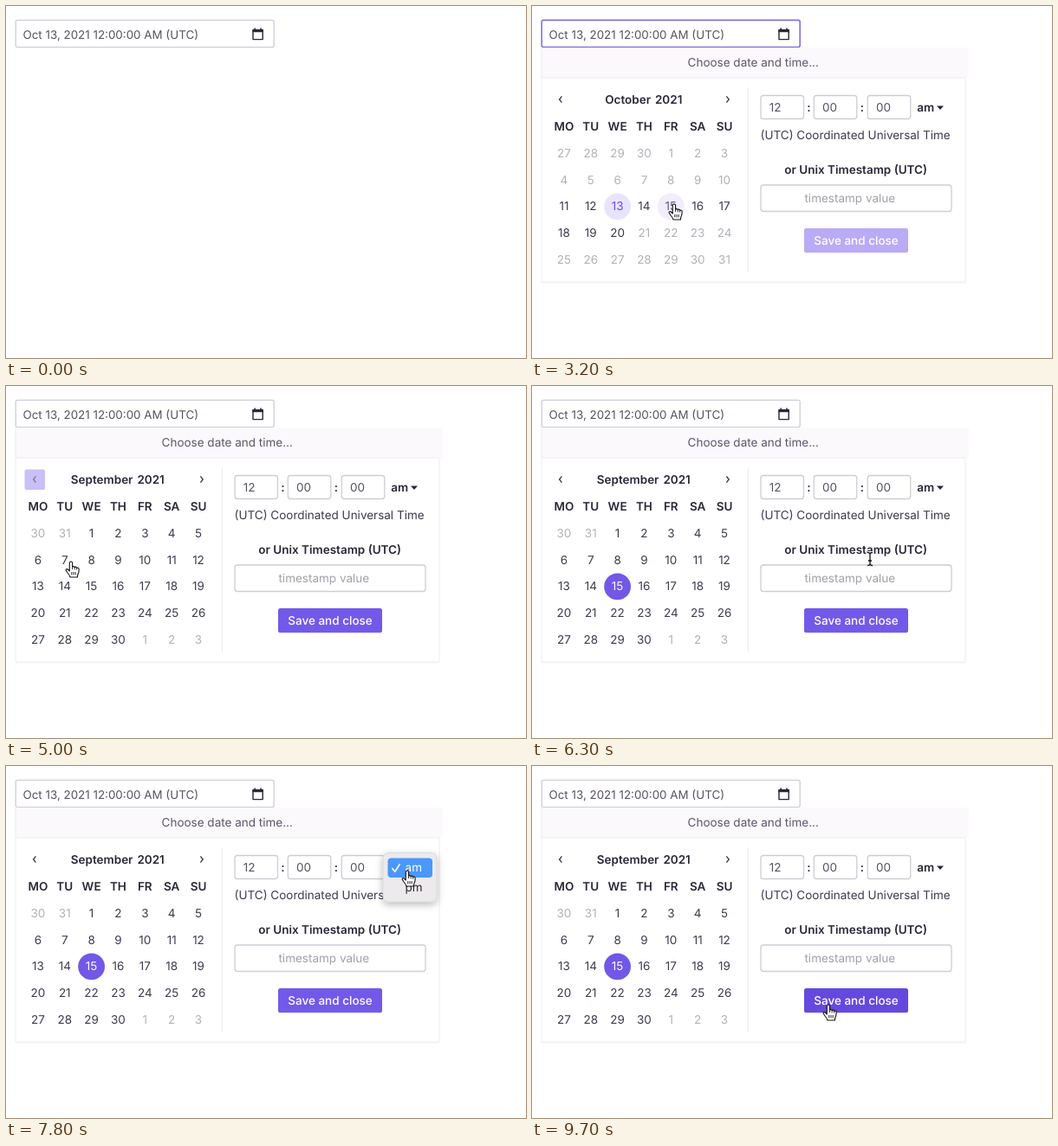
An HTML page for the animation above (9800 ms loop, 600x407 px).

```html
<!DOCTYPE html>
<html lang="en">
<head>
<meta charset="utf-8">
<title>Date and time picker</title>
<style>
  html, body { margin: 0; width: 100%; height: 100%; overflow: hidden; background: #fff; }
  svg { display: block; width: 100%; height: 100%; }
  text { font: 400 13.5px Inter, sans-serif; fill: #3f394c; white-space: pre; text-rendering: geometricPrecision; }
  .mid { text-anchor: middle; }
  .bold { font-weight: 600; fill: #2b2536; }
  .medium { font-weight: 500; }
  .soft { fill: #57515f; }
  .faint { fill: #a3a0a8; }
  .field { fill: #fff; stroke: #d0cdd5; stroke-width: 1.3; }
  .rule { fill: none; stroke: #eeecf0; }
  .chevron { fill: none; stroke: #39334a; stroke-width: 1.3; }
</style>
</head>
<body>
<svg viewBox="0 0 600 407">
  <defs>
    <filter id="shadow" x="-30%" y="-30%" width="160%" height="170%">
      <feDropShadow dx="0" dy="3" stdDeviation="4" flood-opacity=".28"/>
    </filter>
  </defs>

  <rect id="input" class="field" x="11.2" y="16.4" width="298" height="31.2" rx="2"/>
  <text class="soft" x="19.5" y="37.7" style="font-size:13.38px">Oct 13, 2021 12:00:00 AM (UTC)</text>
  <g id="icon">
    <path d="M285 28.2h11.2v10.4h-11.2z" fill="none" stroke="currentColor" stroke-width="1.4" stroke-linejoin="round"/>
    <path d="M284.4 27h12.4v3.3h-12.4zM286.4 25.5h1.6v2h-1.6zM293.2 25.5h1.6v2h-1.6z" fill="currentColor"/>
  </g>

  <g id="popup">
    <rect x="10.5" y="48.3" width="493.5" height="34.7" fill="#fbf9fc"/>
    <path class="rule" d="M11 48.5V319H500V83M11 83H500M249.5 94V308"/>
    <path class="rule" d="M11 320H500.5" opacity=".6"/>
    <text class="mid" x="255.2" y="69.7" style="fill:#5b556b">Choose date and time...</text>
    <g id="weekdays"></g>
    <text id="month" class="mid bold" x="128.8" y="112.7" style="word-spacing:1.5px"></text>

    <g id="fields"></g>
    <text class="bold mid" x="319.5" y="121.8">:</text>
    <text class="bold mid" x="381" y="121.8">:</text>
    <text class="bold" x="444.3" y="122">am</text>
    <path d="M467 115.6h8l-4 4.4z" fill="#2b2536"/>
    <text x="263.5" y="154.3">(UTC) Coordinated Universal Time</text>
    <text class="bold mid" x="373.7" y="193.6">or Unix Timestamp (UTC)</text>
    <rect class="field" x="264" y="207" width="220" height="30.5" rx="3"/>
    <text class="faint mid" x="366.8" y="227">timestamp value</text>

    <g id="late">
      <rect id="prevBack" x="21.5" y="96.5" width="23.5" height="23.5" rx="2" fill="#cabff7"/>
      <path id="prev" class="chevron" d="M34.4 104.4l-2.8 3.6 2.8 3.6"/>
      <path class="chevron" d="M224.4 104.4l2.8 3.6-2.8 3.6"/>
      <g id="days"></g>
      <rect id="save" x="314" y="257" width="120" height="28.2" rx="2.5"/>
      <text class="medium mid" x="374" y="275.6" style="fill:#fff">Save and close</text>
    </g>
  </g>

  <g id="menu">
    <rect x="435" y="100.5" width="62" height="56.5" rx="6" fill="#eceaec" stroke="#cfcdd0" stroke-width=".6" filter="url(#shadow)"/>
    <rect id="choice" x="440.5" width="51.5" height="22.5" rx="4" fill="#4a98fb"/>
    <path id="check" d="M445.8 118.6l3 3.6 5.4-8.4" fill="none" stroke-width="1.6" stroke-linecap="round" stroke-linejoin="round"/>
    <text id="am" x="460.6" y="122">am</text>
    <text id="pm" x="460.6" y="145">pm</text>
  </g>

  <g id="cursor">
    <path id="arrow" d="M0 0V14.6L3.4 11.5 5.9 17 8.2 16 5.8 10.6H10.3Z" fill="#000" stroke="#fff" stroke-width="1.1"/>
    <g id="hand" stroke="#111" stroke-width="1.1" stroke-linejoin="round">
      <path d="M-1.7 1Q0 -1 1.6 1V6Q3 5 4.2 6.4 5.6 5.6 6.6 7.2 9.3 6.6 9.2 9.4L8.8 12.6Q7.5 15 7.4 18H-1Q-1.8 15.4 -4 13L-5.9 10Q-5.6 7.9 -3.6 9L-1.7 11Z" fill="#fff"/>
      <path d="M1.6 6v3M4.2 6.4v3M6.6 7.2v2.4M.8 12v3.4M3 12v3.4M5.2 12v3.4" fill="none" stroke-width=".9"/>
    </g>
    <g id="beam" fill="none">
      <path d="M-3 -7.5Q0 -7.5 0 -5.5 0 -7.5 3 -7.5M0 -5.5V5.5M-3 7.5Q0 7.5 0 5.5 0 7.5 3 7.5M-2 2H2" stroke="#fff" stroke-width="3"/>
      <path d="M-3 -7.5Q0 -7.5 0 -5.5 0 -7.5 3 -7.5M0 -5.5V5.5M-3 7.5Q0 7.5 0 5.5 0 7.5 3 7.5M-2 2H2" stroke="#111" stroke-width="1.3"/>
    </g>
  </g>
</svg>

<script>
const LOOP = 9800, STEP = 100, HOVER_LAG = 200;
const AT = {
  enter: 100, focus: 1000, popup: 1200, late: 1500, pickOctober: 3400,
  september: 4600, pickSeptember: 5700, menuOpen: 7300, menuClose: 9000
};
// time, x, y of the pointer's hot spot
const PATH = [
  [100, 457, 183], [700, 160, 32], [800, 152.5, 27.5], [1900, 152.5, 27.5],
  [2600, 164, 229], [4000, 164, 229], [4400, 33, 108], [4800, 33, 108],
  [5000, 75, 203], [5300, 101, 229], [5900, 101, 229], [6300, 390, 200],
  [6700, 470, 116], [7400, 470, 116], [7700, 463, 121], [7800, 463, 121],
  [7900, 464, 136], [8400, 466, 138], [8800, 436, 214], [9000, 436, 214],
  [9300, 356, 297], [9500, 342, 276], [9800, 342, 276]
];
const COLUMN = 30.85, ROW = 30.8, FIRST = { x: 36.9, y: 170 };

const $ = id => document.getElementById(id);
const show = (id, on) => { $(id).style.display = on ? "" : "none"; };
const inside = (p, x, y, w, h) => p.x >= x && p.x <= x + w && p.y >= y && p.y <= y + h;

function add(parent, tag, attributes, content = "") {
  const node = document.createElementNS(parent.namespaceURI, tag);
  for (const name in attributes) node.setAttribute(name, attributes[name]);
  node.textContent = content;
  return parent.appendChild(node);
}

["MO", "TU", "WE", "TH", "FR", "SA", "SU"].forEach((name, i) =>
  add($("weekdays"), "text", { class: "mid bold", x: FIRST.x + i * COLUMN, y: 143.7 }, name));

[[264, "12"], [325.3, "00"], [387.3, "00"]].forEach(([x, value]) => {
  add($("fields"), "rect", { class: "field", x, y: 103.5, width: 49.5, height: 27, rx: 3 });
  add($("fields"), "text", { class: "soft", x: x + 9.7, y: 122 }, value);
});

const cells = Array.from({ length: 35 }, (_, i) => {
  const x = FIRST.x + i % 7 * COLUMN, y = FIRST.y + Math.floor(i / 7) * ROW;
  return {
    x, y,
    disc: add($("days"), "circle", { cx: x, cy: y + .3, r: 15.4 }),
    label: add($("days"), "text", { class: "mid", x, y: y + 4.7 })
  };
});

function pointer(t) {
  const next = PATH.findIndex(point => point[0] > t);
  if (next < 1) return { x: PATH[0][0], y: -50 };
  const [t0, x0, y0] = PATH[next - 1], [t1, x1, y1] = PATH[next];
  const u = (t - t0) / (t1 - t0), ease = u * u * (3 - 2 * u);
  return { x: x0 + (x1 - x0) * ease, y: y0 + (y1 - y0) * ease };
}

const overInput = p => inside(p, 11, 16, 298, 32);
const overPrev = p => inside(p, 21, 96, 24, 24);
const overSave = p => inside(p, 314, 257, 120, 28);
const overCell = (p, c) => inside(p, c.x - 15.4, c.y - 15.4, 30.8, 30.8);

function calendar(t) {
  const september = t >= AT.september;
  const before = september ? 2 : 4, previous = september ? 31 : 30, length = september ? 30 : 31;
  $("month").textContent = september ? "September 2021" : "October 2021";
  const hover = pointer(t - HOVER_LAG);
  cells.forEach((cell, i) => {
    const n = i - before + 1;
    const day = n < 1 ? previous + n : n > length ? n - length : n;
    const inMonth = n >= 1 && n <= length;
    cell.enabled = inMonth && (september || (n > 10 && n < 21));
    const chosen = n === 15 && t >= (september ? AT.pickSeptember : AT.pickOctober);
    const current = !september && n === 13 && t < AT.pickOctober;
    const hovered = cell.enabled && overCell(hover, cell);
    cell.label.textContent = day;
    cell.label.style.fill = chosen ? "#fff" : current ? "#6b4bdc" : hovered ? "#625b78" : cell.enabled ? "#3f394c" : "#b3b0b7";
    cell.disc.style.fill = chosen ? "#7158e6" : current ? "#e9e4fd" : hovered ? "#f1edfd" : "none";
  });
}

function cursorShape(p, t) {
  const menuOpen = t >= AT.menuOpen && t < AT.menuClose;
  if (menuOpen || overInput(p)) return "hand";
  if (t < AT.popup) return "arrow";
  if (overPrev(p) || overSave(p) || inside(p, 440, 103, 45, 28)) return "hand";
  if (cells.some(c => c.enabled && overCell(p, c))) return "hand";
  if (inside(p, 264, 180, 220, 58) || inside(p, 264, 103, 173, 54)) return "beam";
  return "arrow";
}

function menu(t, p) {
  const open = t >= AT.menuOpen && t < AT.menuClose;
  show("menu", open);
  if (!open) return;
  const onPm = inside(p, 435, 130, 62, 27), onAm = inside(p, 435, 100, 62, 29.9);
  show("choice", onAm || onPm);
  $("choice").setAttribute("y", onPm ? 129.5 : 106.5);
  $("am").style.fill = onAm ? "#fff" : "#2b2930";
  $("pm").style.fill = onPm ? "#fff" : "#2b2930";
  $("check").style.stroke = onAm ? "#fff" : "#2b2930";
}

function draw(t) {
  const p = pointer(t), hover = pointer(t - HOVER_LAG);
  const focused = t >= AT.focus && t < AT.pickOctober;
  $("input").style.stroke = focused ? "#8670d8" : "#d0ccda";
  $("input").style.strokeWidth = focused ? 1.6 : 1.3;
  $("icon").style.color = overInput(hover) ? "#5b41c9" : "#2b2536";
  show("popup", t >= AT.popup);
  show("late", t >= AT.late);
  calendar(t);
  show("prevBack", overPrev(hover));
  $("prev").style.stroke = overPrev(hover) ? "#7d7694" : "";
  $("save").style.fill = t < AT.pickOctober ? "#b9abf6" : overSave(hover) ? "#6549de" : "#7259e9";
  menu(t, p);

  show("cursor", t >= AT.enter);
  $("cursor").setAttribute("transform", `translate(${p.x} ${p.y})`);
  const shape = cursorShape(p, t);
  for (const id of ["arrow", "hand", "beam"]) show(id, id === shape);
}

const start = performance.now();
let last = -1;
function tick() {
  const t = Math.floor((performance.now() - start) % LOOP / STEP) * STEP;
  if (t !== last) draw(last = t);
  requestAnimationFrame(tick);
}
tick();
</script>
</body>
</html>
```
